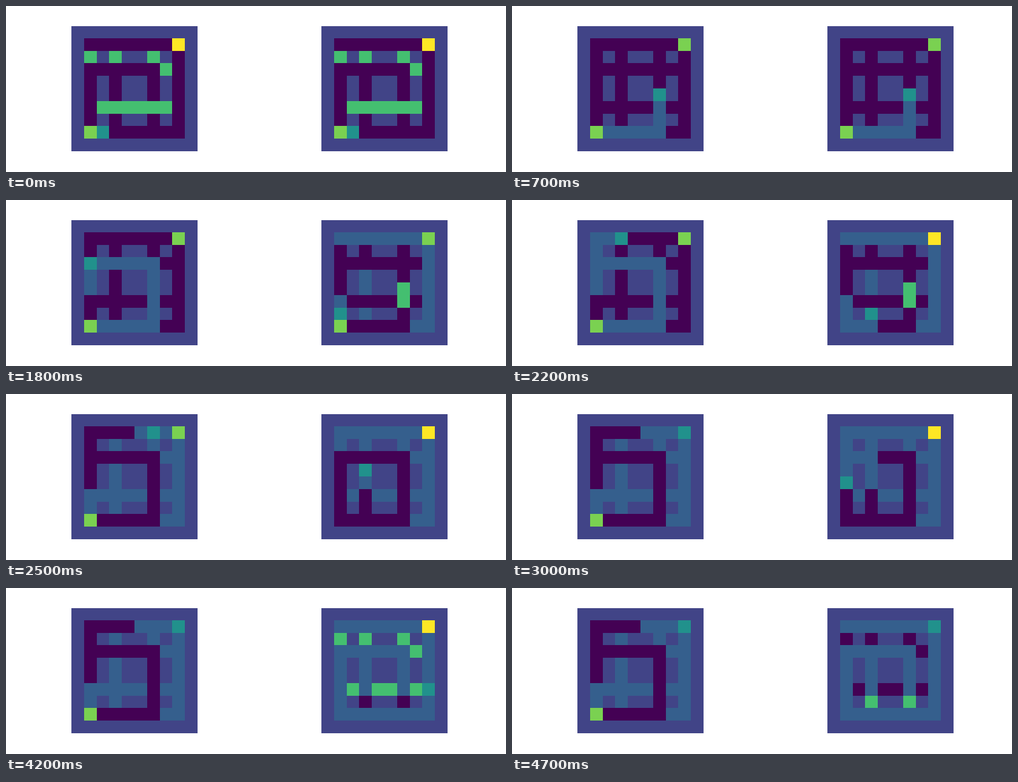
Animation of 864x288 px, one loop 4.8 s. Source, as an HTML page:

```html
<!DOCTYPE html>
<html lang="en">
<head>
<meta charset="utf-8">
<title>Two grid walkers</title>
<style>
  html, body { margin: 0; width: 100%; height: 100%; overflow: hidden; background: #fff; }
  svg { display: block; width: 864px; height: 288px; }
</style>
</head>
<body>
<svg id="stage" viewBox="0 0 864 288" shape-rendering="crispEdges"></svg>
<script>
const STEP = 100, STEPS = 48, SIZE = 10;
const COLOR = {
  floor: '#440154', wall: '#414487', trail: '#355f8d', agent: '#21918c',
  block: '#44bf70', mark: '#7ad151', goal: '#fde725'
};

// Cells are numbered row * 10 + column.
const GOAL = 18, START = 81;
const LINES = [1, 3, 6, 8];
const CELLS = Array.from({ length: SIZE * SIZE }, (_, i) => i);
const isRoad = i => {
  const row = Math.floor(i / SIZE), col = i % SIZE;
  const inside = n => n > 0 && n < SIZE - 1;
  return inside(row) && inside(col) && (LINES.includes(row) || LINES.includes(col));
};
const ROADS = CELLS.filter(isRoad);

const SIDE_BLOCKS = [21, 23, 26, 37, 62, 64, 65, 67];
const FIRST_BLOCKS = [...SIDE_BLOCKS, 63, 66];
const MIDDLE_BLOCKS = [56, 66];
const LOWER_BLOCKS = [73, 76];

// Expands corner cells into a walk of one cell per step.
function walk(...corners) {
  const path = [corners[0]];
  for (const end of corners.slice(1)) {
    let at = path[path.length - 1];
    const unit = (end - at) % SIZE === 0 ? SIZE : 1;
    const delta = Math.sign(end - at) * unit;
    while (at !== end) path.push(at += delta);
  }
  return path;
}

const paint = (cells, list, kind) => list.forEach(i => { cells[i] = kind; });
const open = cells => ROADS.filter(i => cells[i] === 'floor' || cells[i] === 'trail');
const unseen = seen => FIRST_BLOCKS.filter(i => !seen.has(i));

const shared = {
  4(cells) {
    paint(cells, FIRST_BLOCKS, 'floor');
    cells[GOAL] = 'mark';
  },
  11(cells, seen) {
    paint(cells, unseen(seen), 'trail');
    paint(cells, MIDDLE_BLOCKS, 'block');
  },
  25(cells, seen) {
    paint(cells, MIDDLE_BLOCKS, 'floor');
    open(cells).forEach(i => { cells[i] = seen.has(i) ? 'floor' : 'trail'; });
  }
};

const boards = [
  {
    x: 113,
    path: walk(82, 86, 36, 31, 51, 11, GOAL),
    events: {
      ...shared,
      18(cells, seen) {
        paint(cells, unseen(seen), 'floor');
        paint(cells, MIDDLE_BLOCKS, 'trail');
      }
    }
  },
  {
    x: 545,
    path: walk(82, 86, 36, 31, 81, 83, 33, 31, 81, 88, GOAL),
    events: {
      ...shared,
      18(cells, seen) {
        open(cells).forEach(i => {
          cells[i] = seen.has(i) || FIRST_BLOCKS.includes(i) ? 'floor' : 'trail';
        });
      },
      22(cells) { cells[GOAL] = 'goal'; },
      32(cells) {
        paint(cells, ROADS, 'trail');
        paint(cells, SIDE_BLOCKS, 'block');
        paint(cells, [...LOWER_BLOCKS, 85, 86], 'floor');
        cells[GOAL] = 'agent';
      },
      39(cells) { cells[GOAL] = 'goal'; },
      46(cells) {
        paint(cells, SIDE_BLOCKS, 'floor');
        paint(cells, LOWER_BLOCKS, 'block');
      }
    }
  }
];

// Replays a board and keeps the picture of every step.
function replay({ path, events }) {
  const cells = CELLS.map(i => isRoad(i) ? 'floor' : 'wall');
  const seen = new Set();
  paint(cells, FIRST_BLOCKS, 'block');
  cells[START] = 'mark';
  cells[GOAL] = 'goal';
  return Array.from({ length: STEPS }, (_, step) => {
    if (events[step]) events[step](cells, seen);
    if (step > 0 && step < path.length) {
      cells[path[step - 1]] = 'trail';
      seen.add(path[step - 1]);
    }
    const view = cells.slice();
    view[path[Math.min(step, path.length - 1)]] = 'agent';
    return view;
  });
}

const edgeX = n => Math.round(n * 21.8);
const edgeY = n => Math.max(0, edgeX(n) - 1);

function addCell(left, i) {
  const row = Math.floor(i / SIZE), col = i % SIZE;
  const rect = document.createElementNS('http://www.w3.org/2000/svg', 'rect');
  const box = {
    x: left + edgeX(col), y: 35 + edgeY(row),
    width: edgeX(col + 1) - edgeX(col), height: edgeY(row + 1) - edgeY(row)
  };
  for (const key in box) rect.setAttribute(key, box[key]);
  return document.getElementById('stage').appendChild(rect);
}

for (const board of boards) {
  board.views = replay(board);
  board.rects = CELLS.map(i => addCell(board.x, i));
}

function draw(ms) {
  const step = Math.floor(ms / STEP) % STEPS;
  for (const { views, rects } of boards) {
    rects.forEach((rect, i) => rect.setAttribute('fill', COLOR[views[step][i]]));
  }
}

const began = performance.now();
function tick() {
  draw(performance.now() - began);
  requestAnimationFrame(tick);
}
tick();
</script>
</body>
</html>
```
